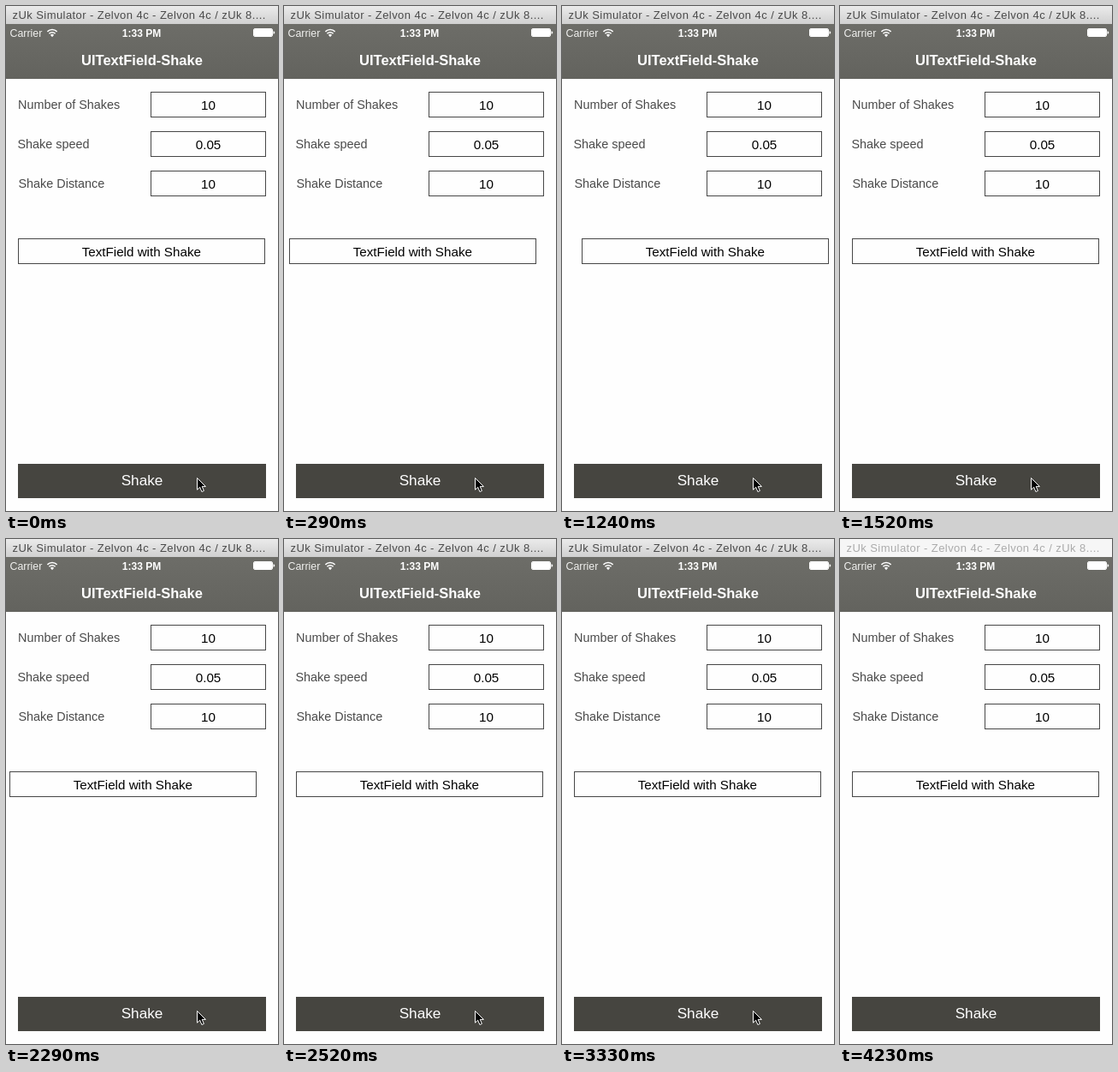
Recreate the animation shown at these times as an HTML page. Size 318 px wide and 589 px high, loop 4.33 s.

```html
<!DOCTYPE html>
<html lang="en">
<head>
<meta charset="utf-8">
<title>UITextField-Shake</title>
<style>
  html, body { margin: 0; width: 100%; height: 100%; overflow: hidden; background: #fefefe; }
  svg { display: block; width: 318px; height: 589px; font-family: "Liberation Sans", Arial, sans-serif; }
  .label { font-size: 14.4px; fill: #4a4a4a; }
  .value { font-size: 15.2px; fill: #000; text-anchor: middle; }
  .box { fill: #fefefe; stroke: #474747; }
  .mid { text-anchor: middle; }
</style>
</head>
<body>
<svg viewBox="0 0 318 589">
  <defs>
    <linearGradient id="chrome" x2="0" y2="1">
      <stop stop-color="#ebebeb"/><stop offset="1" stop-color="#d0d0d0"/>
    </linearGradient>
    <linearGradient id="nav" x2="0" y2="1">
      <stop stop-color="#6d6d68"/><stop offset="1" stop-color="#63635e"/>
    </linearGradient>
  </defs>
  <rect width="318" height="589" fill="#fefefe"/>

  <rect id="bar" width="318" height="21" fill="url(#chrome)"/>
  <text id="caption" x="7.5" y="15" font-size="13" letter-spacing=".43" fill="#4a4a4a">zUk Simulator - Zelvon 4c - Zelvon 4c / zUk 8....</text>

  <rect y="21" width="318" height="64" fill="url(#nav)"/>
  <g fill="#fff">
    <text x="4.5" y="36" font-size="12.4" fill="#f0f0ee">Carrier</text>
    <text class="mid" x="158.5" y="35.5" font-size="12" font-weight="bold">1:33 PM</text>
    <text class="mid" x="159" y="69" font-size="16.5" font-weight="bold">UITextField-Shake</text>
    <path d="M54 36.2L51.9 33.8A3 3 0 0 1 56.1 33.8Z"/>
    <g fill="none" stroke="#fff" stroke-width="1.5">
      <path d="M50.4 32.2A5 5 0 0 1 57.6 32.2M48.4 29.9A8 8 0 0 1 59.6 29.9"/>
      <rect x="289.5" y="26.5" width="22" height="9" rx="1.5" stroke-width="1"/>
    </g>
    <rect x="290" y="27" width="21" height="8" rx="1"/>
    <path d="M312.5 29.2Q314.3 29.5 314.3 31T312.5 32.8Z"/>
  </g>

  <g id="rows"></g>

  <g id="field">
    <rect class="box" x="14.5" y="271.5" width="288" height="29"/>
    <text class="value" x="158.3" y="292">TextField with Shake</text>
  </g>

  <rect x="14" y="534" width="290" height="40" fill="#464540"/>
  <text class="mid" x="159" y="559" font-size="17.2" fill="#fff">Shake</text>

  <path id="cursor" d="M.5 .5V14.2L3.7 11.2L5.9 16.5L8.4 15.4L6.2 10.4H10.4Z" fill="#000" stroke="#fff"/>
</svg>
<script>
const LOOP = 4330, BLUR = 4230;
const $ = id => document.getElementById(id);

$('rows').innerHTML = [
  [14, 'Number of Shakes', '10'],
  [13.5, 'Shake speed', '0.05'],
  [14.5, 'Shake Distance', '10']
].map(([x, label, value], i) => {
  const y = 100 + 46 * i;
  return `<text class="label" x="${x}" y="${y + 19.8}">${label}</text>
    <rect class="box" x="169.5" y="${y + .5}" width="134" height="29"/>
    <text class="value" x="236.5" y="${y + 21}">${value}</text>`;
}).join('');

// Each burst: start, end, then the offset held during each step.
const bursts = [
  [180, 520, [4, -8, -10, 3, 10, 5]],
  [1240, 1520, [9, -10, -4, 10, 3]],
  [2120, 2520, [2, -5, -10, 4, -8, -3, 3]],
  [2990, 3330, [7, -6, -10, 0, 10, 6]]
];

function shift(t) {
  const burst = bursts.find(([a, b]) => t >= a && t < b);
  if (!burst) return 0;
  const [a, b, steps] = burst;
  return steps[Math.floor((t - a) / (b - a) * steps.length)];
}

function pointer(t) {
  const step = Math.min(5, Math.max(0, Math.floor((t - 3510) / 60) + 1));
  const p = (step / 4) ** 1.5;
  return [223 + 35 * p, 550 + 32 * p, step < 5];
}

function draw(t) {
  const idle = t >= BLUR;
  $('bar').setAttribute('fill', idle ? '#f6f6f6' : 'url(#chrome)');
  $('caption').setAttribute('fill', idle ? '#ababab' : '#4a4a4a');
  $('field').setAttribute('transform', `translate(${shift(t)} 0)`);
  const [x, y, shown] = pointer(t);
  $('cursor').setAttribute('transform', `translate(${x} ${y})`);
  $('cursor').setAttribute('visibility', shown ? 'visible' : 'hidden');
}

const start = performance.now();
function tick() {
  draw((performance.now() - start) % LOOP);
  requestAnimationFrame(tick);
}
draw(0);
requestAnimationFrame(tick);
</script>
</body>
</html>
```
